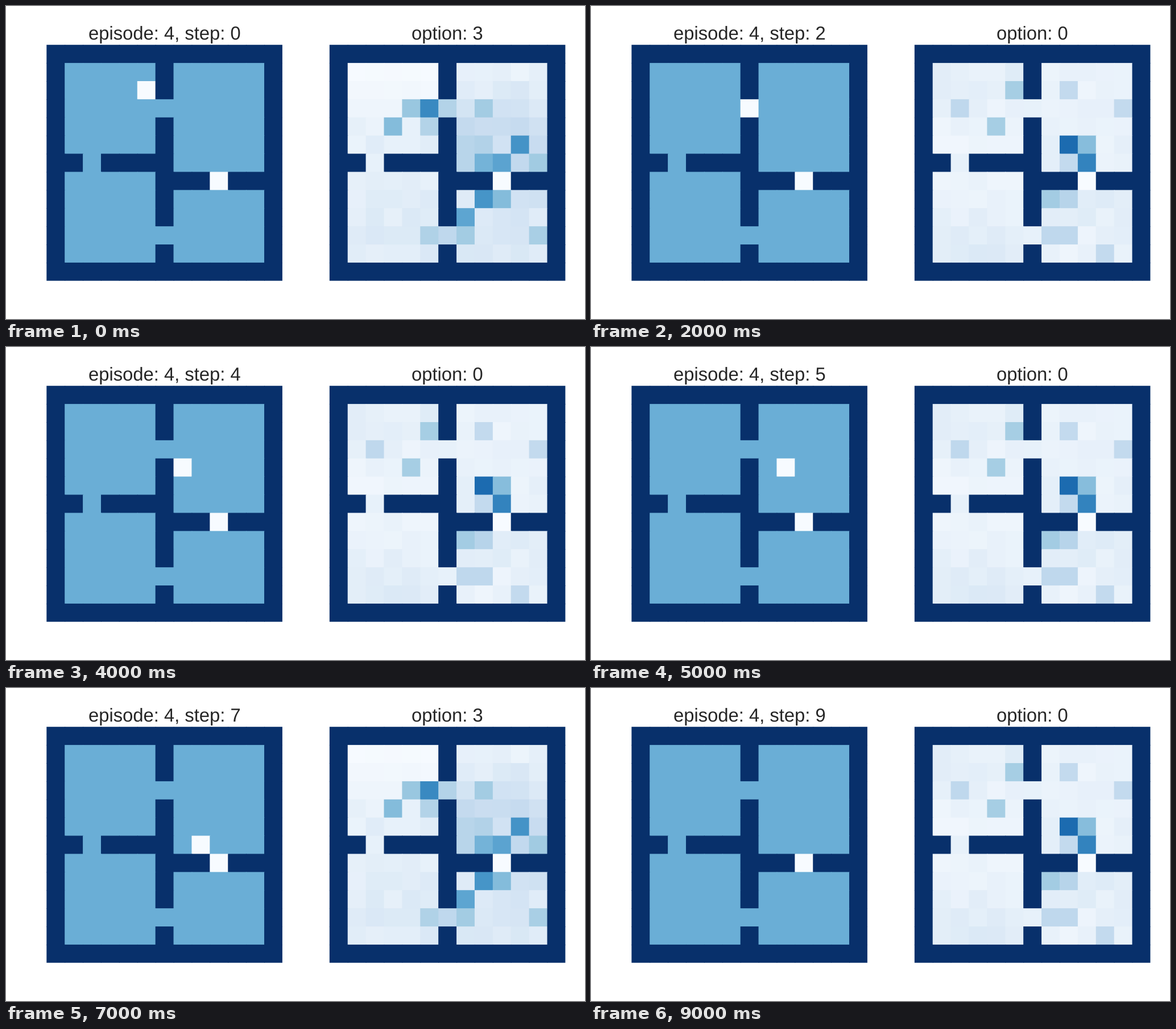
Recreate the animation shown at these times as a matplotlib script. Size 1018 px wide and 550 px high, loop 10 s.

```python
import matplotlib.pyplot as plt
import numpy as np
from itertools import product
from matplotlib.animation import FuncAnimation
from matplotlib.collections import PatchCollection
from matplotlib.patches import Rectangle

plt.rcParams["text.hinting"] = "no_hinting"

WIDTH, HEIGHT, DPI = 1018, 550, 64  # this dpi divides the stage size exactly
CELLS, SIDE, TOP, LEFT = 13, 414.6, 68.2, 71.3
RIGHT = LEFT + 1.2 * SIDE
WALL, FLOOR, MARK = 100, 50, 0

ROOMS = [np.s_[1:6, 1:6], np.s_[1:7, 7:12], np.s_[7:12, 1:6], np.s_[8:12, 7:12]]
GOAL = (7, 9)
DOORS = [(3, 6), (6, 2), (10, 6), GOAL]

START, MOVES = (2, 5), "DRRDRDDRD"
OPTIONS = [3] + [0] * 5 + [3] * 3 + [0]

# Termination probability in percent: a ramp from the top row to the
# bottom row of each room, and the cells that stand out from it
RAMPS = {
    0: [(10, 5), (6, 8), (6, 11), (11, 6)],
    3: [(1, 9), (8, 30), (10, 12), (16, 15)],
}
PEAKS = {
    0: {(2, 5): 35, (3, 2): 27, (4, 4): 35, (2, 8): 26, (3, 11): 26,
        (5, 8): 77, (5, 9): 43, (6, 8): 26, (6, 9): 68,
        (8, 7): 36, (8, 8): 30, (10, 7): 27, (10, 8): 27, (11, 10): 26},
    3: {(3, 4): 39, (3, 5): 66, (4, 3): 44, (4, 5): 31, (3, 6): 31,
        (3, 8): 36, (5, 10): 62, (6, 8): 48, (6, 9): 55, (8, 8): 61,
        (8, 9): 44, (9, 7): 54, (10, 5): 32, (10, 6): 27, (10, 7): 36,
        (10, 11): 34},
}


def floor_plan(level):
    grid = np.full((CELLS, CELLS), float(WALL))
    for part in ROOMS + DOORS:
        grid[part] = level
    grid[GOAL] = MARK
    return grid


def termination_map(option):
    rng = np.random.default_rng(option)
    grid = floor_plan(8)
    for room, (top, bottom) in zip(ROOMS, RAMPS[option]):
        rows, cols = grid[room].shape
        ramp = np.linspace(top, bottom, rows)[:, None]
        grid[room] = ramp * rng.uniform(0.7, 1.3, (rows, cols))
    for cell, value in PEAKS[option].items():
        grid[cell] = value
    return grid


def walk():
    row, col = START
    path = [START]
    for move in MOVES:
        row, col = row + (move == "D"), col + (move == "R")
        path.append((row, col))
    return path


def add_panel(ax, left):
    size = SIDE / CELLS
    # Cells reach a little under the next ones, so no seams show
    tiles = [Rectangle((left + col * size, TOP + row * size),
                       size + (col < CELLS - 1), size + (row < CELLS - 1))
             for row, col in product(range(CELLS), repeat=2)]
    panel = PatchCollection(tiles, cmap="Blues", edgecolor="none",
                            linewidth=0, antialiased=True)
    panel.set_clim(0, 100)
    panel.set_snap(False)
    ax.add_collection(panel)
    title = ax.text(left + SIDE / 2, 59, "", ha="center", va="baseline",
                    color="#262626", family="Liberation Sans",
                    fontsize=32.8 * 72 / DPI)
    return panel, title


fig = plt.figure(figsize=(WIDTH / DPI, HEIGHT / DPI), dpi=DPI,
                 facecolor="white")
ax = fig.add_axes([0, 0, 1, 1], xlim=(0, WIDTH), ylim=(HEIGHT, 0))
ax.axis("off")
world, world_title = add_panel(ax, LEFT)
heat, heat_title = add_panel(ax, RIGHT)

PATH = walk()
MAPS = {option: termination_map(option) for option in RAMPS}


def update(step):
    grid = floor_plan(FLOOR)
    grid[PATH[step]] = MARK
    world.set_array(grid.ravel())
    world_title.set_text(f"episode: 4, step: {step}")

    option = OPTIONS[step]
    heat.set_array(MAPS[option].ravel())
    heat_title.set_text(f"option: {option}")
    return world, world_title, heat, heat_title


anim = FuncAnimation(fig, update, frames=len(PATH), interval=1000,
                     init_func=lambda: update(0), repeat=True, repeat_delay=0)
plt.show()
```
